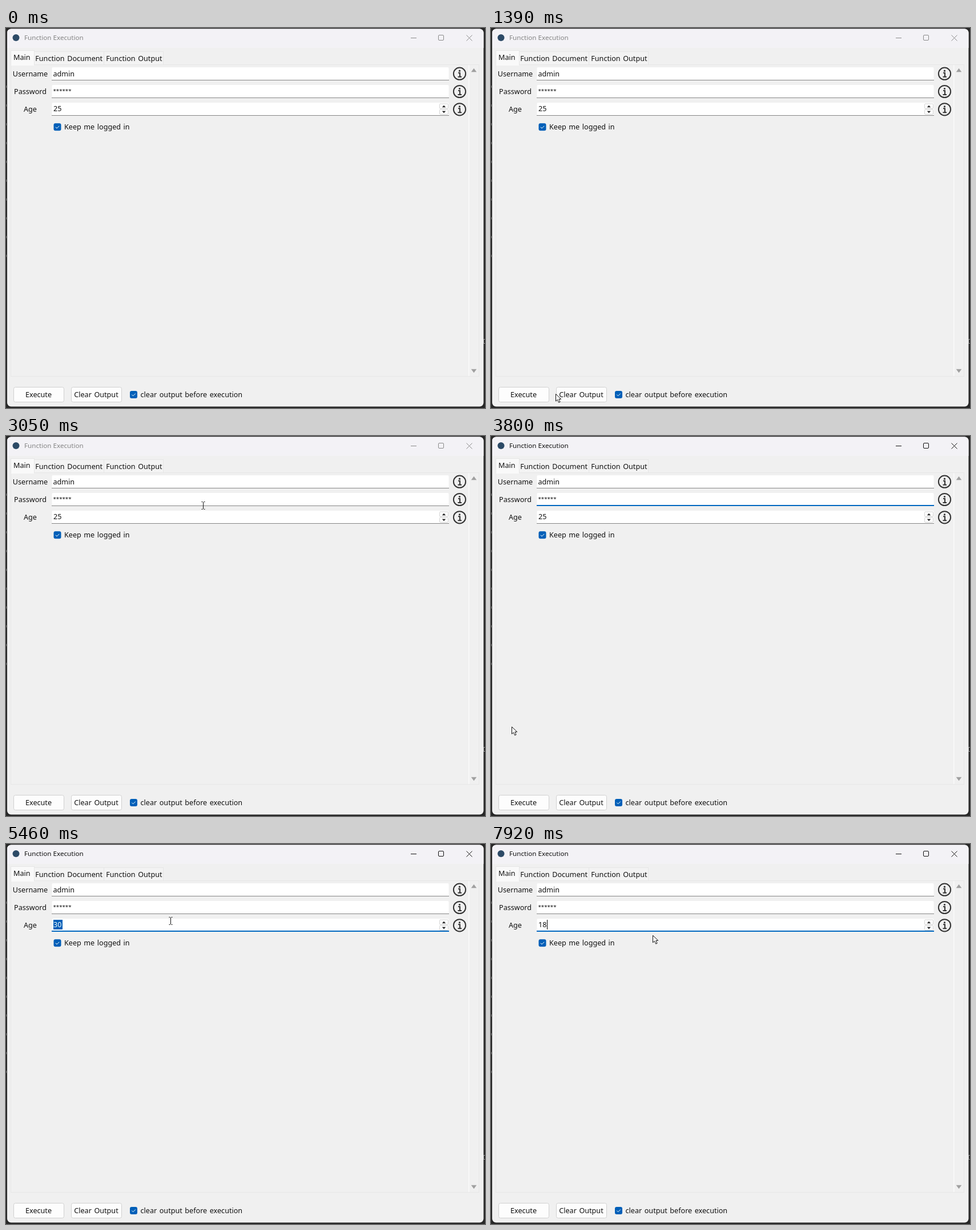
Recreate the animation shown at these times as an HTML page. Size 839 by 667 pixels, loop 7990 ms.

```html
<!DOCTYPE html>
<html lang="en">
<head>
<meta charset="utf-8">
<title>Function Execution</title>
<style>
  html, body { margin: 0; width: 100%; height: 100%; overflow: hidden; background: #272727; }
  svg { display: block; width: 100%; height: 100%; }
  text { font: 12.6px "Noto Sans", "Open Sans", sans-serif; word-spacing: 1.3px; fill: #111; white-space: pre; }
  .title { font-size: 11.65px; word-spacing: 0; }
  .stars { font-size: 9.7px; }
  .mid { text-anchor: middle; }
</style>
</head>
<body>
<svg id="stage" viewBox="0 0 839 667"></svg>
<script>
const LOOP = 7990, STEP = 67;
const BLUE = '#005fb8';
const FIELDS = ['user', 'pass', 'age'];
const fieldTop = i => 69 + 31 * i;
const stage = document.getElementById('stage');

const rect = (x, y, w, h, fill, extra = '') =>
  `<rect x="${x}" y="${y}" width="${w}" height="${h}" fill="${fill}" ${extra}/>`;
const label = (x, y, s, extra = '') => `<text x="${x}" y="${y}" ${extra}>${s}</text>`;
const path = (d, extra) => `<path d="${d}" ${extra}/>`;
const triangle = (x, y, w, h, fill) =>
  path(`M${x - w} ${y + h / 2}L${x} ${y - h / 2}L${x + w} ${y + h / 2}Z`, `fill="${fill}"`);

const info = y => `<g transform="translate(794.5 ${y})" stroke="#333" stroke-width="2" fill="none">
  <circle r="10.6"/><path d="M-2.5 -1.5H.5V5.5M-3 5.5H3.5"/>
  <circle cy="-5" r="1.6" fill="#333" stroke="none"/></g>`;

const row = (name, i) => {
  const y = fieldTop(i);
  return label(42.5, y + 15.7, name, 'class="mid"') + info(y + 11.2 + i * .3) +
    rect(80.5, y, 695, 23, '#fff', 'rx="2"') + `<path id="${FIELDS[i]}" fill="none"/>`;
};

const check = (x, y, name) => rect(x, y, 13, 13, BLUE, 'rx="3"') +
  path(`M${x + 3.3} ${y + 6.5}l2.3 2.3l4.2 -4.2`, 'fill="none" stroke="#fff"') +
  label(x + 18.5, y + 11, name);

const tab = (x, y, w, h, fill) => rect(x + .5, y + .5, w, h, fill, 'stroke="#e6e6e6"');

const button = (x, id, name) =>
  rect(x + .5, 630.5, 88, 26, '#fdfdfd', `id="${id}" rx="3" stroke="#d0d0d0"`) +
  label(x + 44, 648, name, 'class="mid"');

const spin = (y, dir) => rect(759.5, y, 15, 8.5, '#fdfdfd', 'rx="1.5" stroke="#d4d4d4"') +
  triangle(767, y + 4.5, 3.2, dir * 3.5, '#222');

const edgeMarks = Array.from({ length: 10 }, (_, i) => rect(0, 101 + 33 * i, 1, 4, '#777')).join('');

stage.innerHTML = `
  ${rect(0, 0, 839, 667, '#272727')}
  ${edgeMarks}
  ${path('M839 546.5H836.5V553.5H839', 'fill="none" stroke="#999"')}
  <clipPath id="frame">${rect(2, 1.5, 834.5, 663, '#fff', 'rx="7"')}</clipPath>
  <g clip-path="url(#frame)">
    ${rect(0, 0, 839, 667, '#f0f0f0')}
    ${rect(0, 0, 839, 35, '#f3f2f6')}
  </g>
  <circle cx="17.5" cy="17" r="6" fill="#2c4a66"/>
  ${label(32, 21, 'Function Execution', 'id="title" class="title"')}
  <g id="controls" fill="none">
    <path d="M709 17.5H719M806.5 12.5l10 10m0 -10l-10 10"/>
    <rect x="757.5" y="12.5" width="9" height="9" rx="1.5"/>
  </g>
  ${rect(8.5, 64.5, 820, 547, '#f0f0f0', 'stroke="#e7e7e7"')}
  ${tab(49, 41, 122, 23, '#f3f3f3')}
  ${tab(171, 41, 104, 23, '#f3f3f3')}
  ${tab(8, 39, 41, 25, '#f9f9f9')}
  ${rect(9, 64, 40, 2, '#f9f9f9')}
  ${label(13, 56, 'Main')}
  ${label(51.3, 58, 'Function Document')}
  ${label(175.3, 58, 'Function Output')}
  ${rect(810, 65, 1.5, 546, '#fafafa')}
  ${triangle(819.5, 74, 4.8, 6.5, '#a0a0a0')}
  ${triangle(819.5, 602, 4.8, -6.5, '#a0a0a0')}
  ${['Username', 'Password', 'Age'].map(row).join('')}
  ${label(82.5, 84.5, 'admin')}
  ${label(82.5, 113.5, '******', 'class="stars"')}
  ${rect(83, 133, 16, 17, BLUE, 'id="selection"')}
  ${label(83, 146, '25', 'id="years"')}
  <path id="caret" stroke="#000" fill="none"/>
  ${spin(133, 1)}${spin(143, -1)}
  ${check(83.5, 167.3, 'Keep me logged in')}
  ${button(13, 'run', 'Execute')}${button(114, 'clear', 'Clear Output')}
  ${check(217, 637, 'clear output before execution')}
  <g id="arrow"><path d="M.5 .5V13L3.5 10.3L5.7 15.3L8 14.3L5.9 9.4H9.8Z" fill="#fff" stroke="#111" stroke-linejoin="round"/></g>
  <g id="beam"><path d="M-2.5 -6.5H-.5M1.5 -6.5H3.5M.5 -6V6M-2.5 6.5H-.5M1.5 6.5H3.5" fill="none" stroke="#111"/></g>`;

const $ = id => document.getElementById(id);
const set = (id, attrs) => {
  for (const k in attrs) $(id).setAttribute(k, attrs[k]);
};
const show = (id, on) => set(id, { visibility: on ? 'visible' : 'hidden' });
const linear = p => p;
const smooth = p => p * p * (3 - 2 * p);

// Each move bends from the previous end, past `via`, to `to`.
const moves = [
  { start: 3, end: 472, via: [175, 655], to: [180, 641] },
  { start: 853, end: 1657, via: [130, 645], to: [80, 640], ease: linear },
  { start: 2430, end: 3100, via: [400, 330], to: [342, 110] },
  { start: 3463, end: 3798, via: [150, 360], to: [36, 510] },
  { start: 3798, end: 4267, via: [50, 750], to: [180, 391] },
  { start: 4293, end: 4830, via: [344, 160], to: [302, 147] },
  { start: 5113, end: 5448, via: [294, 138], to: [288, 135] },
  { start: 7583, end: 7918, via: [288, 147], to: [283, 160] }
];

function pointer(t) {
  let at = [170, 680];
  for (const { start, end, via, to, ease = smooth } of moves) {
    if (t < start) break;
    const time = Math.floor((t - start) / STEP) * STEP;
    const p = ease(Math.min(1, time / (end - start))), q = 1 - p;
    at = at.map((v, i) => q * q * v + 2 * q * p * via[i] + p * p * to[i]);
  }
  return at.map(Math.round);
}

// The wheel counts up to 30 and back, then a new age is typed.
function ageAt(t) {
  if (t < 5180) return '25';
  if (t < 6520) return String(30 - Math.min(4, Math.abs(Math.floor((t - 5180) / 70) - 4)));
  return t < 6660 ? '' : t < 6860 ? '1' : '18';
}

// Focus and typing restart the caret's blink.
const blinkOn = t => {
  const since = [3160, 4990, 6520, 6860].findLast(s => s <= t);
  return (t - since) % 900 < 600;
};

function draw(t) {
  const [x, y] = pointer(t);
  const inside = (l, top, w, h) => x >= l && x <= l + w && y >= top && y <= top + h;
  const overField = FIELDS.some((_, i) => inside(80, fieldTop(i), 696, 23));
  show('arrow', t >= 70 && !overField);
  show('beam', overField);
  set(overField ? 'beam' : 'arrow', { transform: `translate(${x} ${y})` });

  for (const [id, left] of [['run', 13], ['clear', 114]]) {
    const hot = inside(left, 630, 89, 27);
    set(id, { fill: hot ? '#e0eef3' : '#fdfdfd', stroke: hot ? '#0078d4' : '#d0d0d0' });
  }

  const active = t >= 3250;
  const focus = !active ? '' : t < 4990 ? 'pass' : 'age';
  $('title').style.fill = active ? '#111' : '#858585';
  set('controls', { stroke: active ? '#111' : '#8a8a8a' });
  FIELDS.forEach((id, i) => {
    const on = id === focus;
    const lineY = fieldTop(i) + (on ? 22 : 22.5);
    set(id, { d: `M80 ${lineY}H776`, stroke: on ? '#0067c0' : '#868686', 'stroke-width': on ? 2 : 1 });
  });

  const age = ageAt(t);
  const selected = t >= 5180 && t < 6520;
  $('years').textContent = age;
  $('years').style.fill = selected ? '#fff' : '#111';
  show('selection', selected);
  show('caret', active && !selected && blinkOn(t));
  set('caret', { d: focus === 'pass' ? 'M115.5 103V120' : `M${83.5 + 7.5 * age.length} 133V150` });
}

function tick() {
  draw(performance.now() % LOOP);
  requestAnimationFrame(tick);
}
tick();
</script>
</body>
</html>
```
